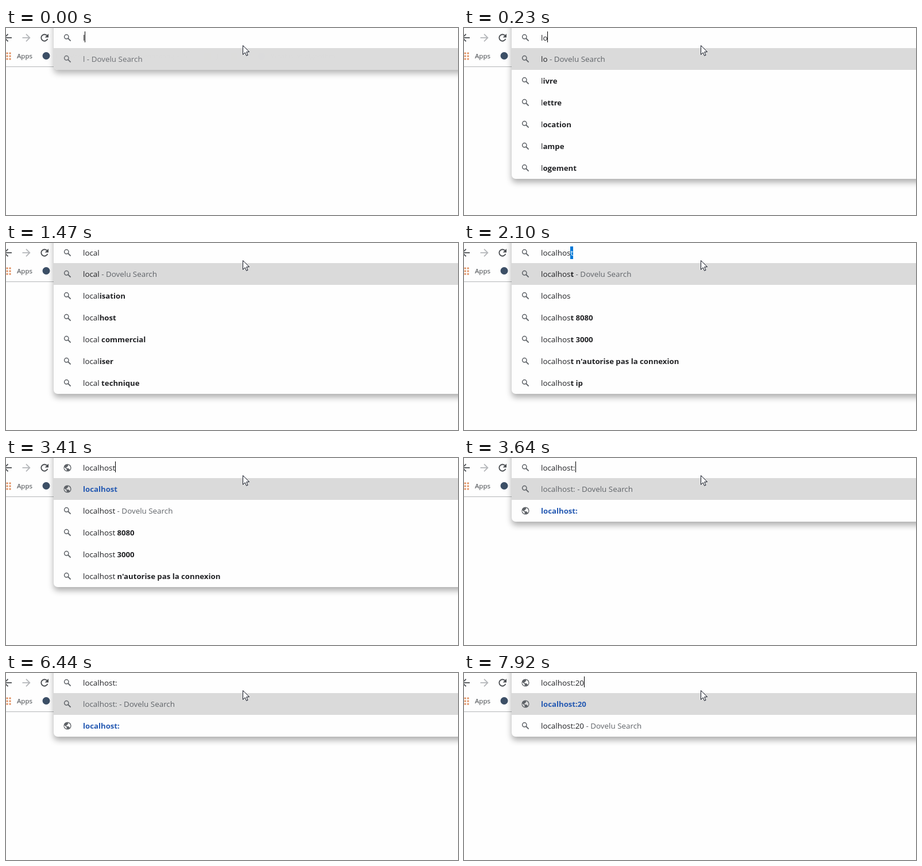
These frames come from a looping animation (787x326 px, 8 s). An HTML page with a canvas:

```html
<!DOCTYPE html>
<html lang="en">
<head>
<meta charset="utf-8">
<title>Address bar</title>
<style>
html, body { margin: 0; width: 100%; height: 100%; overflow: hidden; background: #fefefe; }
canvas { display: block; }
</style>
</head>
<body>
<canvas id="stage" width="787" height="326"></canvas>
<script>
const ctx = document.getElementById('stage').getContext('2d');
const W = 787, H = 326, LOOP = 8000;
const LEFT = 83, TOP = 35, ROW = 38, TEXT_X = 134;
const FAMILY = '"Open Sans", "Noto Sans", sans-serif';
const REGULAR = '13.4px ' + FAMILY, BOLD = '700 13.2px ' + FAMILY, SMALL = '11.6px ' + FAMILY;
const INK = '#202124', GRAY = '#5f6368', BLUE = '#2459b2';

// Each row is an icon followed by runs of [text, colour, font].
const search = (typed, rest = '', color = INK) => ({
  icon: lens,
  runs: [[typed, color, REGULAR], [rest, INK, BOLD], [' - Dovelu Search', GRAY, REGULAR]]
});
const hint = (typed, rest = '') => ({ icon: lens, runs: [[typed, INK, REGULAR], [rest, INK, BOLD]] });
const site = url => ({ icon: globe, runs: [[url, BLUE, BOLD]] });
const hints = (typed, ...rests) => [search(typed), ...rests.map(r => hint(typed, r))];
const hostRows = typed => {
  const rest = 'localhost'.slice(typed.length);
  return [search(typed, rest), hint(typed),
    ...[' 8080', ' 3000', " n'autorise pas la connexion", ' ip'].map(s => hint(typed, rest + s))];
};

const CAR = ['tion voiture', 'tion', 'tion appartement', 'tion voiture pas cher'];
const lRows = hints('l', 'ivre', 'ettre', 'ocation', 'ampe', 'ogement');
const loRows = hints('lo', 'cation', 'gement', 'cation voiture', 'giciel', 'isirs');
const locRows = hints('loc', ...CAR.map(s => 'a' + s), ' annonce');
const locaRows = hints('loca', ...CAR, 'lisation');
const localRows = hints('local', 'isation', 'host', ' commercial', 'iser', ' technique');
const fullRows = [site('localhost'), search('localhost'),
  ...[' 8080', ' 3000', " n'autorise pas la connexion"].map(s => hint('localhost', s))];
const colonRows = url => [search(url, '', GRAY), site(url)];
const portRows = url => [site(url), search(url)];

const replaceFirst = (rows, first) => [first, ...rows.slice(1)];

// [start, typed text, rows, completion, panel opacity]
const STEPS = [
  [0, 'l', [search('l', '', GRAY)], '', 0.9],
  [90, 'l', lRows],
  [230, 'lo', replaceFirst(lRows, search('lo'))],
  [320, 'lo', loRows],
  [630, 'loc', replaceFirst(loRows, search('loc'))],
  [700, 'loc', locRows],
  [780, 'loca', locaRows],
  [930, 'local', replaceFirst(locaRows, search('local'))],
  [1010, 'local', localRows],
  [1640, 'localh', replaceFirst(localRows, search('localh'))],
  [1700, 'localh', hostRows('localh'), 'ost'],
  [1870, 'localho', hostRows('localho'), 'st'],
  [2100, 'localhos', hostRows('localhos'), 't'],
  [2330, 'localhost', fullRows],
  [3640, 'localhost:', colonRows('localhost:')],
  [5050, 'localhost:/', colonRows('localhost:/')],
  [5980, 'localhost:', colonRows('localhost:')],
  [7690, 'localhost:2', portRows('localhost:2')],
  [7920, 'localhost:20', portRows('localhost:20')]
];
const CARET_OFF = [[1470, 1640], [2880, 3410], [4190, 4740], [5600, 5980], [6440, 6990], [7540, 7690]];

function write(text, x, y, color, font) {
  ctx.font = font;
  ctx.fillStyle = color;
  ctx.fillText(text, x, y);
  return x + ctx.measureText(text).width;
}

function dot(x, y, r, color) {
  ctx.fillStyle = color;
  ctx.beginPath();
  ctx.arc(x, y, r, 0, Math.PI * 2);
  ctx.fill();
}

function line(points, color, width) {
  ctx.strokeStyle = color;
  ctx.lineWidth = width;
  ctx.beginPath();
  points.forEach(([x, y]) => ctx.lineTo(x, y));
  ctx.stroke();
}

function shape(points, x, y, color) {
  ctx.fillStyle = color;
  ctx.beginPath();
  points.forEach(([dx, dy]) => ctx.lineTo(x + dx, y + dy));
  ctx.closePath();
  ctx.fill();
}

function lens(x, y) {
  ctx.strokeStyle = GRAY;
  ctx.lineWidth = 1.5;
  ctx.beginPath();
  ctx.arc(x - 1.7, y - 1.7, 3.7, 0, Math.PI * 2);
  ctx.stroke();
  line([[x + 1, y + 1], [x + 5.6, y + 5.6]], GRAY, 1.8);
}

function globe(x, y, land) {
  dot(x, y, 6.6, GRAY);
  shape([[-5.2, -1], [-1.4, 2.6], [-1.4, 5.2], [-3.6, 4], [-5.4, 1.2]], x, y, land);
  shape([[1, -5.2], [3.6, -3.8], [5.2, -1], [5, 2.4], [3.8, 3.2], [2.4, 1.2], [-1.8, 0.8],
    [-1.8, -1], [0, -1.4], [0.4, -3], [1.4, -3.4]], x, y, land);
}

function arrow(x, dir, color) {
  const y = 17;
  line([[x - 6.5 * dir, y], [x + 6 * dir, y]], color, 1.8);
  line([[x, y - 6.3], [x + 6.3 * dir, y], [x, y + 6.3]], color, 1.8);
}

function reload() {
  const x = 67, y = 17;
  ctx.strokeStyle = '#4a4d51';
  ctx.lineWidth = 1.9;
  ctx.beginPath();
  ctx.arc(x, y, 5.7, 0.35, Math.PI * 1.77);
  ctx.stroke();
  shape([[7, -7], [7, -0.6], [0.6, -0.6]], x, y, '#4a4d51');
}

function folder(x) {
  ctx.fillStyle = '#f0cf55';
  ctx.fillRect(x, 43, 5, 3);
  ctx.fillRect(x, 44, 12, 11);
}

function toolbar() {
  arrow(3.5, -1, '#4a4d51');
  arrow(35, 1, '#b5b7ba');
  reload();
  for (const x of [-2.6, 2, 7])
    for (const y of [44, 49, 54]) {
      ctx.fillStyle = '#de8b5a';
      ctx.fillRect(x - 1.4, y - 1.4, 2.9, 2.9);
    }
  const label = (text, x) => write(text, x, 53, '#3f4347', SMALL);
  label('Apps', 19);
  dot(70, 48.5, 6.5, '#3c4f66');
  label('Hop Pad', 86);
  folder(145);
  label('1', 167);
  dot(198, 49, 6.5, '#30343a');
  label('Authenticating RES...', 214);
  folder(345);
  label('J', 367);
  folder(391);
  label('C', 413);
  dot(445, 49, 6.5, '#2aa3b5');
  label('What is an algorithm...', 461);
  ctx.fillStyle = '#b4b6b8';
  ctx.fillRect(0, 67, W, 1);
}

function panelPath(bottom) {
  ctx.beginPath();
  ctx.roundRect(LEFT, -20, W - LEFT + 40, bottom + 20, 7);
}

function panel(rows, alpha) {
  const bottom = TOP + ROW * rows.length;
  ctx.save();
  ctx.globalAlpha = alpha;
  ctx.save();
  ctx.shadowColor = 'rgba(0,0,0,0.32)';
  ctx.shadowBlur = 11;
  ctx.shadowOffsetY = 6;
  ctx.fillStyle = '#fefefe';
  panelPath(bottom);
  ctx.fill();
  ctx.restore();

  ctx.save();
  panelPath(bottom);
  ctx.clip();
  ctx.fillStyle = '#dadada';
  ctx.fillRect(LEFT, TOP, W - LEFT, ROW);
  ctx.restore();

  rows.forEach((row, i) => {
    const y = TOP + 19 + ROW * i;
    row.icon(107, y, i ? '#fefefe' : '#dadada');
    let x = TEXT_X;
    for (const [text, color, font] of row.runs) x = write(text, x, y + 5, color, font);
  });
  ctx.restore();
}

function input(typed, rows, completion, caret) {
  ctx.fillStyle = '#fefefe';
  ctx.fillRect(LEFT, 0, W - LEFT, TOP);
  rows[0].icon(107, 17, '#fefefe');
  const end = write(typed, TEXT_X, 22, INK, REGULAR);
  if (completion) {
    ctx.fillStyle = '#0078d7';
    ctx.fillRect(Math.round(end), 6, Math.round(ctx.measureText(completion).width), 22);
    write(completion, end, 22, '#fff', REGULAR);
  } else if (caret) {
    ctx.fillStyle = '#000';
    ctx.fillRect(Math.round(end), 6, 1, 19);
  }
}

function pointer() {
  const tip = [[0.5, 0.5], [0.5, 16.3], [4.2, 12.8], [6.6, 18.3], [9, 17.3], [6.7, 11.8], [11.6, 11.6]];
  shape(tip, 412, 30, '#fff');
  ctx.strokeStyle = '#101522';
  ctx.lineWidth = 1;
  ctx.stroke();
}

function draw(t) {
  const [, typed, rows, completion = '', alpha = 1] = STEPS.findLast(s => s[0] <= t);
  const caret = !CARET_OFF.some(([from, to]) => t >= from && t < to);
  ctx.fillStyle = '#fefefe';
  ctx.fillRect(0, 0, W, H);
  toolbar();
  panel(rows, alpha);
  input(typed, rows, completion, caret);
  pointer();
}

const start = performance.now();
function tick() {
  draw((performance.now() - start) % LOOP);
  requestAnimationFrame(tick);
}
tick();
</script>
</body>
</html>
```
